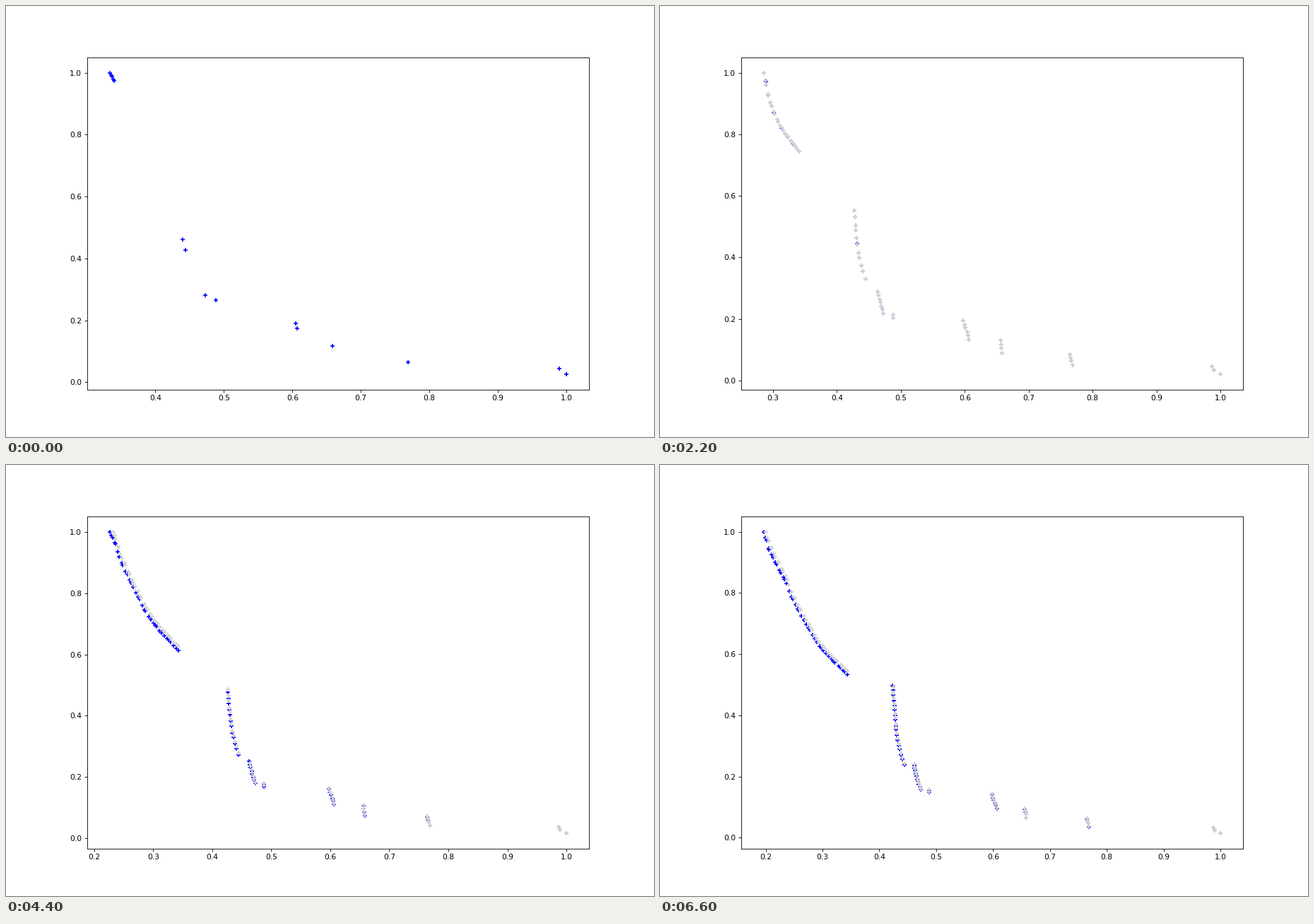
Write a matplotlib script that moves like this. It is 917 px wide and 611 px high and loops after 6800 ms.

```python
import numpy as np
import matplotlib.pyplot as plt
from matplotlib.animation import FuncAnimation

WIDTH, HEIGHT, DPI = 917, 611, 76.4
FRAMES, INTERVAL = 34, 200

# How the front grows over the generations; it rests at 10-11 and 25-26.
GENS = [0, 6, 7, 10, 11, 17, 22, 25, 26, 33]
TIP = [.3335, .3039, .3005, .2856, .2856, .2542, .2263, .224, .224, .1967]
SCALE = [1, .826, .833, .77, .77, .701, .638, .632, .632, .558]
REACH = [.08, .45, .6, .68, .68, .6, .74, .78, .78, 1]
COUNT = [5, 20, 20, 23, 23, 34, 34, 33, 33, 41]

# Unscaled curve of the long upper branch.
BRANCH_X = [.1967, .2068, .2265, .2342, .2442, .2653, .28, .2927, .3113, .3436]
BRANCH_Y = [1.792, 1.68, 1.552, 1.511, 1.42, 1.287, 1.2, 1.13, 1.06, .957]

# Lower groups from bottom to top: size, growth speed, x and unscaled y.
GROUPS = [
    (17, 1, [.4444, .4395, .436, .4325, .4295, .427, .4235],
     [.4276, .467, .51, .56, .63, .74, .89]),
    (10, 1.1, [.473, .4675, .4625, .461], [.281, .332, .39, .424]),
    (2, 4, [.488, .4878], [.265, .276]),
    (6, 4, [.6065, .604, .5995, .598], [.173, .203, .233, .252]),
    (4, 3, [.6585, .6575, .656], [.117, .137, .168]),
    (4, 3, [.7685, .767, .7645], [.0655, .083, .111]),
    (3, 8, [1, .991, .987], [.025, .038, .059]),
]


def at(gen, values):
    return np.interp(gen, GENS, values)


def spread(n, amount):
    """Values from 0 to 1, evenly spaced but for a little repeatable noise."""
    t = np.linspace(0, 1, n)
    noise = np.random.default_rng(4).uniform(-amount, amount, 60)
    t[1:-1] += noise[:n - 2] / (n - 1)
    return t


def branch(gen):
    tip, scale = at(gen, TIP), at(gen, SCALE)
    base = .34 + .0001 * gen
    x = tip + (base - tip) * spread(int(round(at(gen, COUNT))), .4) ** 1.15
    y = scale * np.interp(x, BRANCH_X, BRANCH_Y)
    # The newest part bends up so that the tip always sits at 1.
    y += (1 - y[0]) * np.exp((tip - x) / .012)
    return x, y


def group(gen, n, speed, xs, ys):
    t = spread(n, .15)
    t = t[t <= min(1, speed * at(gen, REACH))]
    y = ys[0] + (ys[-1] - ys[0]) * t
    return np.interp(y, ys, xs), y * at(gen, SCALE)


def front(gen):
    parts = [branch(gen)] + [group(gen, *g) for g in GROUPS]
    x, y = np.hstack(parts)
    if gen > 0 and at(gen, SCALE) == at(gen - 1, SCALE):
        # A resting front still finds a few points close to known ones.
        rng = np.random.default_rng(gen)
        new = rng.choice(np.arange(1, len(x)), gen * 3 // 4, replace=False)
        x = np.append(x, x[new])
        y = np.append(y, y[new] * rng.uniform(.985, 1.015, len(new)))
    return x, y


fig, ax = plt.subplots(figsize=((WIDTH + .01) / DPI, (HEIGHT + .01) / DPI), dpi=DPI)


def draw(gen):
    ax.clear()
    ax.scatter(*front(gen), marker="+", color="blue")
    if gen > 0:
        ax.scatter(*front(gen - 1), marker="+", color="lightgray", linewidth=1.75)
    return []


anim = FuncAnimation(fig, draw, frames=FRAMES, interval=INTERVAL,
                     init_func=lambda: [], repeat=True)
plt.show()
```
